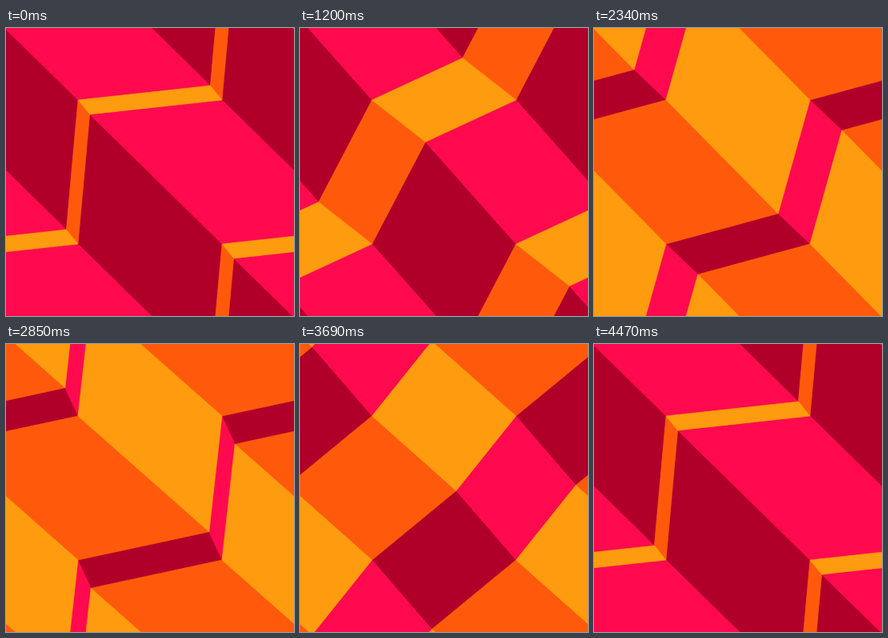
Write an HTML page with a canvas that moves like this. It is 360 by 360 pixels and loops after 4.5 s.

```html
<!DOCTYPE html>
<html>
<head>
<meta charset="utf-8">
<style>
  html, body { margin: 0; height: 100%; overflow: hidden; background: #b0002a; }
  canvas { display: block; }
</style>
</head>
<body>
<canvas id="stage" width="360" height="360"></canvas>
<script>
const ctx = document.getElementById('stage').getContext('2d');
const CELL = 180, LOOP = 4500, STEP = 30;
const YELLOW = '#ff9b0f', ORANGE = '#ff5a0c', DARK = '#b0002a', PINK = '#ff0a4e';

// Periodic wobble: mean, then [cos, sin] weights of each harmonic.
const wobbleX = [88.5, [-59.54, -42.2], [-14.46, 2.41], [0.14, 0.29]];
const wobbleY = [81.6, [-62.32, -38.46], [-2.64, -6.69], [1.35, 2.85]];

function wave([mean, ...harmonics], angle) {
  return harmonics.reduce((sum, [c, s], i) =>
    sum + c * Math.cos((i + 1) * angle) + s * Math.sin((i + 1) * angle), mean);
}

function quad(color, ...points) {
  ctx.fillStyle = ctx.strokeStyle = color;
  ctx.beginPath();
  for (const [x, y] of points) ctx.lineTo(x, y);
  ctx.closePath();
  ctx.fill();
  ctx.stroke(); // hides the seams between neighbours
}

function draw(time) {
  const step = Math.floor((time % LOOP) / STEP);
  const angle = step / (LOOP / STEP - 1) * 2 * Math.PI;
  const dx = wave(wobbleX, angle), dy = wave(wobbleY, angle);
  ctx.lineWidth = 0.6;

  for (let row = -3; row <= 2; row++) {
    for (let col = -3; col <= 2; col++) {
      if ((row + col) % 2) continue;
      // Lattice point (i, j) from this cell, shifted by k times the moving offset.
      const at = (i, j, k = 0) =>
        [90 + (col + i) * CELL + k * dx, 90 + (row + j) * CELL + k * dy];
      quad(DARK, at(0, 0, 1), at(1, 1), at(1, 2, -1), at(0, 1));
      quad(PINK, at(0, 0, 1), at(1, 0), at(2, 1, -1), at(1, 1));
      quad(ORANGE, at(0, 0), at(0, 0, 1), at(0, 1), at(0, 1, -1));
      quad(YELLOW, at(0, 0), at(1, 0, -1), at(1, 0), at(0, 0, 1));
    }
  }
}

const start = performance.now();
function tick() {
  draw(performance.now() - start);
  requestAnimationFrame(tick);
}
tick();
</script>
</body>
</html>
```
